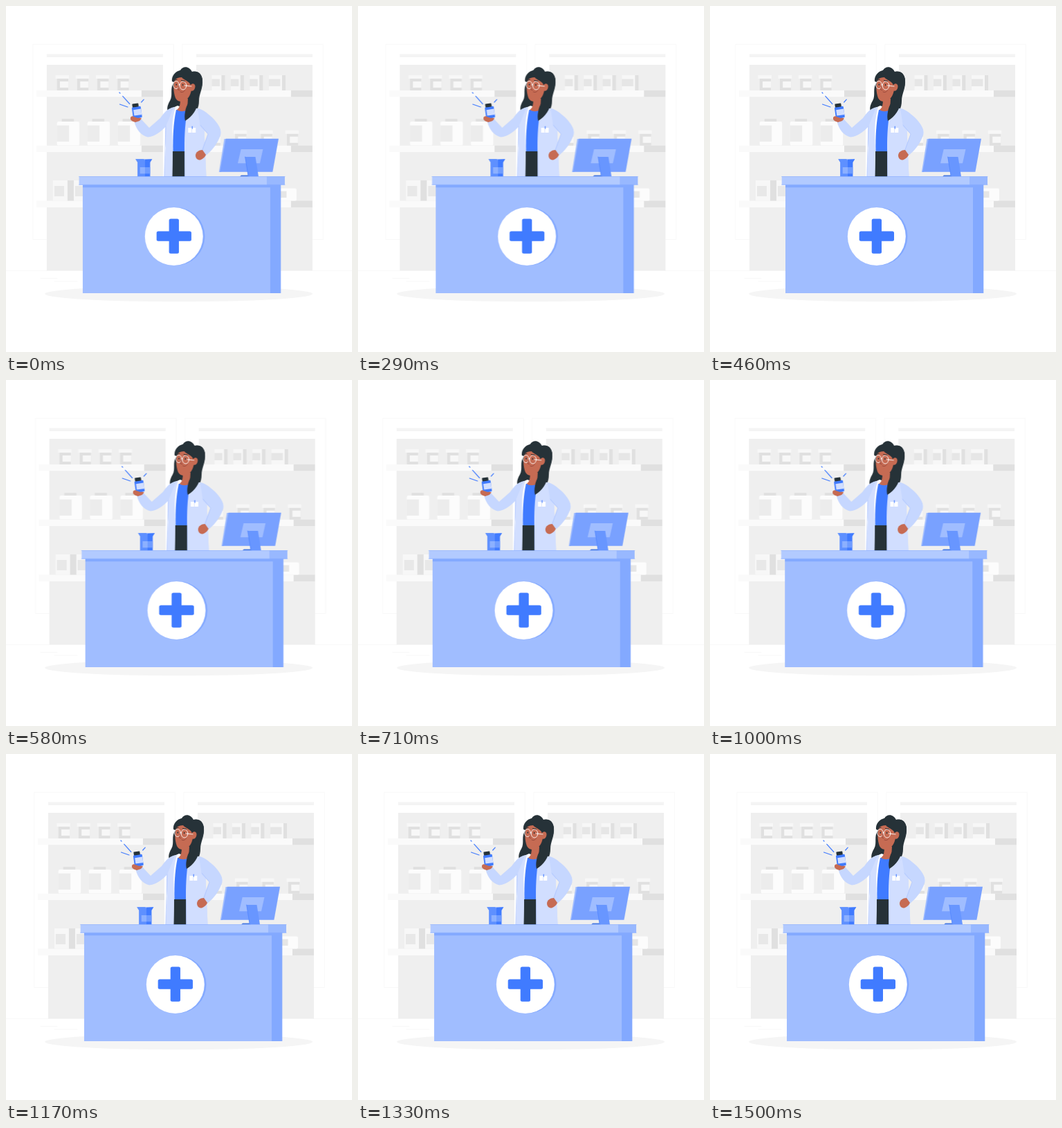
An HTML page for the animation above (1.54 s loop, 500 px wide and 500 px high).

```html
<!DOCTYPE html>
<html lang="en">
<head>
<meta charset="utf-8">
<title>Pharmacy counter</title>
<style>
html, body { margin: 0; width: 100%; height: 100%; overflow: hidden; background: #fff; }
svg { display: block; width: 100vw; height: 100vh; }
#scene { animation: shake 1540ms linear infinite; }
/* 1500 ms shake, entered 26 ms in, then a short rest */
@keyframes shake {
  0% { transform: translateX(-.17px); }
  8.05%, 85.97% { transform: translateX(-1px); }
  17.79%, 76.23% { transform: translateX(2px); }
  27.53%, 47.01%, 66.49% { transform: translateX(-4px); }
  37.27%, 56.75% { transform: translateX(4px); }
  95.71%, 100% { transform: translateX(0); }
}
.main { fill: #407bff; }
.front { fill: #a0bdff; }
.side { fill: #83a9ff; }
.coat { fill: #d1deff; }
.sleeve { fill: #c6d7ff; }
.skin { fill: #c66b53; }
.dark { fill: #263238; }
.pale { fill: #f7f7f7; }
.grey { fill: #e0e0e0; }
.white { fill: #fff; }
.line { fill: none; stroke-linecap: round; stroke-linejoin: round; }
</style>
</head>
<body>
<svg viewBox="0 0 500 500">
  <defs>
    <g id="unit">
      <path class="line" stroke="#f8f8f8" stroke-width=".9" d="M39.3 55.4H242.3V337.5H39.3Z"/>
      <path fill="#f4f4f4" d="M59 69.5H227V74H59Z"/>
      <path fill="#efefef" d="M59 85H227V382.5H59Z"/>
      <path fill="#fafafa" d="M44 122H196V131.3H44ZM44 201.7H196V211H44ZM44 281.5H196V291H44Z"/>
      <path class="grey" d="M196 122H227V131.3H196ZM196 201.7H227V211H196ZM196 281.5H227V291H196Z"/>
    </g>
    <g id="jar">
      <path class="grey" d="M2.3 4H18.5V22H2.3Z"/>
      <path class="pale" d="M0 0H19.5V5H0ZM6.5 9H18.5V18H6.5Z"/>
    </g>
    <g id="tub">
      <path class="grey" d="M7 0H24.5V4.5H7Z"/>
      <rect y="4" width="32.5" height="34.5" rx="2" fill="#fcfcfc"/>
      <path fill="#ececec" d="M0 9.5H17.5V33H0Z"/>
    </g>
    <g id="carton">
      <path class="pale" d="M0 0H14V22H0Z"/>
      <path class="grey" d="M14 0H19V22H14Z"/>
      <path fill="#e6e6e6" d="M0 5.5H11.5V16H0Z"/>
    </g>
  </defs>

  <path class="line" stroke="#f7f7f7" stroke-width=".8" d="M0 382.6H500M50 393.5H74M70 398H103"/>
  <ellipse cx="249.6" cy="416" rx="193.5" ry="11.3" fill="#f5f5f5"/>

  <g id="scene">
    <use href="#unit"/>
    <use href="#unit" x="216"/>
    <g id="stock"></g>
    <path class="pale" d="M68 252H89.5V281.5H68ZM98 252H125V281.5H98Z"/>
    <path class="grey" d="M89 252H98V281.5H89Z"/>
    <path fill="#e8e8e8" d="M70 260H84V275H70ZM100 260H118V275H100Z"/>
    <rect x="385" y="263.5" width="35" height="18" rx="2" fill="#fcfcfc"/>
    <path fill="#e6e6e6" d="M390 267.5H405.5V277H390Z"/>

    <!-- pharmacist -->
    <g>
      <path class="dark" d="M243 110C236 119 242 128 237 137C233 144 231 151 237 155L265 164C275 155 279 147 279 137C279 127 285 119 284 107C283 98 277 93 269 95C265 87 256 86 252 93C245 94 239 101 240 109Z"/>
      <path class="coat" d="M239 147L252 145L277 148C285 160 287 174 287 190L289.5 247H228.8L231 205C229 184 229 164 239 147Z"/>
      <path class="white" d="M239 148L248 144L262 149L258 247H241L240 208C238 186 240 166 239 148Z"/>
      <path class="main" d="M246 150H262L258 211H241.5C241 190 242 169 246 150Z"/>
      <path class="dark" d="M241 210H258.5V247H240.3Z"/>
      <path class="coat" d="M263 147L277 149C285 160 287 174 287 190L289.5 247H258.5L258 205C258 185 259 167 263 147Z"/>
      <path class="skin" d="M252 133L263 134L262 150C257 153 251 153 247 150C251 147 252 143 252 133Z"/>
      <path class="coat" d="M240 147L245 146C239 166 240 184 241 208L240.3 247H228.8L231 205C229 184 229 164 240 147Z"/>

      <path class="sleeve" d="M242 147C234 147 229 154 223 162L207 176L194 162L185.5 167C188 178 195 187 205 189.5C214 189 224 182 231 174Z"/>
      <path class="sleeve" d="M277 148C284 149 290 154 298 161C306 169 312 178 310.5 185C307 197 299 208 289 216L283 208L292 185L281 174Z"/>
      <path class="line" stroke="#a6c0ff" stroke-width=".6" d="M231 174L230 205L228.8 246M281 172L292 185L284 208M258.5 210L258.7 246"/>
      <path class="skin" d="M284 208C279 208 274 211 274 216C274 220 277 223 281 222.5C285 221 288 218 289 215Z"/>
      <path class="skin" d="M180 162C181 159 187 159 190 160L196 162.5L193 166L187 168C183 167 180 165 180 162Z"/>

      <path class="skin" d="M245 104C241 113 242 125 245 133C248 139 256 140 261 135C266 131 267 125 268 122C273 123 275 118 273 114C271 111 268 113 267 114C264 108 257 107 254 103Z"/>
      <path class="dark" d="M243 108C248 102 256 101 261 104C266 108 267 112 267 118L270 124C269 134 260 142 259 153C258 158 258 162 259 166C269 160 277 149 277 139C277 128 285 119 284 106C282 95 275 93 268 96C261 87 249 93 246 98Z"/>
      <path class="skin" d="M267 114C271 110 275 114 273 119C272 122 269 124 267 122Z"/>
      <path class="line" stroke="#fff" stroke-opacity=".85" stroke-width="1" d="M258 115L268 116M250.3 114H251.2"/>
      <g class="line" stroke="#fff" stroke-opacity=".85" stroke-width="1">
        <ellipse cx="246" cy="114" rx="4.3" ry="5.5"/>
        <ellipse cx="256" cy="115" rx="4.8" ry="6"/>
      </g>
      <path class="line" stroke="#263238" stroke-width="1" d="M243.5 107.5L247 106.5M253.5 107.5L258.5 108.5"/>
      <ellipse class="dark" cx="246.3" cy="113.5" rx=".8" ry="1.3"/>
      <ellipse class="dark" cx="255.6" cy="114" rx=".8" ry="1.3"/>
      <path class="line" stroke="#8f4238" stroke-width=".8" d="M250 115L248.5 121L251 121.5M252 124C255 125.5 257 124 258.5 122"/>

      <rect class="white" x="263.3" y="176" width="11" height="7" rx=".6"/>
      <path class="line main" stroke="#407bff" stroke-width="1.1" d="M269.2 174V177.3"/>
      <path class="line" stroke="#c6d7ff" stroke-width=".7" d="M268.6 178.5V182.5"/>

      <g transform="rotate(-8 189 152)">
        <rect class="main" x="182.6" y="145.5" width="13" height="16.5" rx="1.6"/>
        <path fill="#d1deff" d="M184.5 149.5H195.6V158H184.5Z"/>
        <rect class="dark" x="183.8" y="140.8" width="9" height="5" rx=".8"/>
      </g>
      <path class="skin" d="M180 162C180 159.5 183 158.5 185 160L192 162.5C195 163 195 165 192 166L186 167C182 166 180 165 180 162Z"/>
      <path class="line" stroke="#407bff" stroke-width="1.2" d="M168.8 130.3L178.8 141.5M164.5 142L176 146M195.7 139L199.2 135.2M164 125L165 126.2"/>
    </g>

    <!-- beaker -->
    <path class="side" d="M187.3 221.2H211.3L208.3 226V246.5H190.3V226Z"/>
    <path fill="#5e90ff" d="M187.3 221.2H199L201.5 224V246.5H190.3V226Z"/>
    <path class="main" d="M201 222L211.3 221.2L208.3 226V246.5H201Z"/>
    <path fill="#8cb0ff" d="M193.7 233H201V242.3H193.7Z"/>
    <path fill="#6f9cff" d="M201 233H208.3V242.3H201Z"/>

    <!-- monitor -->
    <path class="front" d="M315.5 192H320L311 240H307.8Z"/>
    <path fill="#79a1ff" d="M317.8 191.8H394L385.4 239.7H309.2Z"/>
    <path class="front" d="M339.7 207H371.5L367 227.3H335Z"/>
    <path fill="#4678e0" d="M340 244.5H352V246.5H338Z"/>
    <path fill="#6896ff" d="M345.5 218H360.5L365 246.5H350Z"/>
    <path class="line" stroke="#4f85ff" stroke-width=".7" d="M345.7 218L350.2 246"/>

    <!-- counter -->
    <path class="front" d="M111 258H382V415H111Z"/>
    <path class="side" d="M111 258H397.3V262.3H111ZM382 258H397.3V415H382Z"/>
    <path fill="#b2caff" d="M105.7 246.4H377.3V258.4H105.7Z"/>
    <path fill="#98b8ff" d="M377 246.4H403V258.4H377Z"/>
    <path class="line" stroke="#83a9ff" stroke-width=".6" d="M105.7 246.5H403M105.7 258.3H403"/>
    <circle class="side" cx="245.5" cy="333" r="42"/>
    <circle class="white" cx="242.8" cy="333" r="42"/>
    <rect class="main" x="217.7" y="325.5" width="50.3" height="14.3" rx="2.5"/>
    <rect class="main" x="235.7" y="307.5" width="14.3" height="50.3" rx="2.5"/>
  </g>
</svg>
<script>
const stock = document.getElementById('stock');
function row(id, x, y, gap, count) {
  for (let i = 0; i < count; i++) {
    const item = document.createElementNS('http://www.w3.org/2000/svg', 'use');
    item.setAttribute('href', '#' + id);
    item.setAttribute('x', x + i * gap);
    item.setAttribute('y', y);
    stock.append(item);
  }
}
row('jar', 71.5, 100, 29.2, 4);
row('tub', 73.7, 163, 44, 3);
row('carton', 297.5, 100, 27.4, 3);
row('carton', 380, 100, 0, 1);
row('carton', 385, 100, 0, 1);
row('jar', 291.5, 179.7, 37.4, 4);
</script>
</body>
</html>
```
